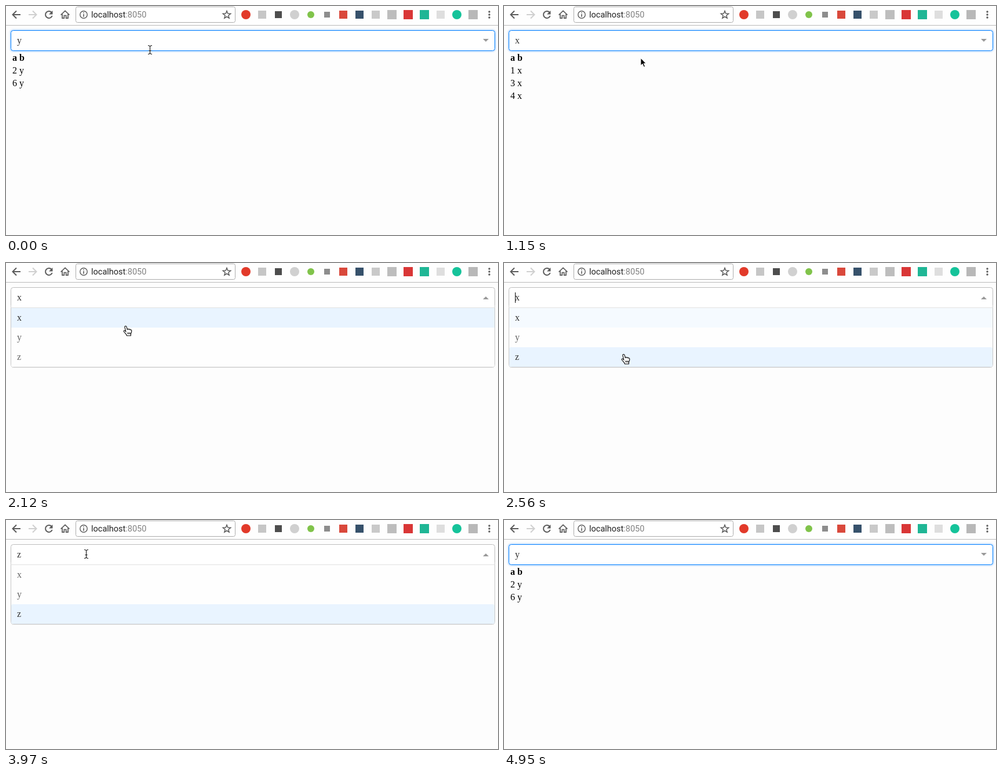
Recreate the animation shown at these times as an HTML page. Size 849x397 px, loop 5.93 s.

```html
<!DOCTYPE html>
<html lang="en">
<head>
<meta charset="utf-8">
<title>Dropdown filter</title>
<style>
  html, body { margin: 0; width: 100%; height: 100%; overflow: hidden; background: #fdfdfd; }
  svg { display: block; }
  .page { font: 16px "Liberation Serif", Times, serif; white-space: pre; }
  .url { font: 14.5px Roboto, "Liberation Sans", sans-serif; }
  .line { fill: none; stroke: #5a5a5a; stroke-width: 2; }
</style>
</head>
<body>
<svg width="849" height="397" viewBox="0 0 849 397">
  <!-- browser toolbar -->
  <rect width="849" height="33" fill="#fefefe"/>
  <path d="M0 33.5H849" stroke="#b9b9b9"/>
  <path id="back" class="line" d="M25 15H12M18 8.5L11.5 15L18 21.5"/>
  <path class="line" style="stroke:#cfcfcf" d="M39 15H52M46 8.5L52.5 15L46 21.5"/>
  <path class="line" d="M78.6 11A6 6 0 1 0 79.7 17"/>
  <path d="M80.5 8V14.5H74Z" fill="#5a5a5a"/>
  <path class="line" style="stroke-width:1.7" d="M94.5 15.5L102 8.5L109.5 15.5M97 14V21.2H100.3V16.5H103.7V21.2H107V14"/>
  <rect x="120.5" y="1.5" width="275" height="27" rx="3" fill="#fff" stroke="#ababab"/>
  <circle cx="134" cy="15" r="6.2" class="line" style="stroke-width:1.4"/>
  <path d="M134 11V12.6M134 14V18.8" class="line" style="stroke-width:1.6"/>
  <text class="url" x="147" y="20" fill="#222">localhost<tspan fill="#808080">:8050</tspan></text>
  <path id="star" class="line" style="stroke-width:1.5"/>
  <g id="extensions"></g>
  <g fill="#5a5a5a"><circle cx="834" cy="10" r="1.7"/><circle cx="834" cy="15" r="1.7"/><circle cx="834" cy="20" r="1.7"/></g>

  <g class="page">
    <g id="table"></g>
    <g id="glow" fill="none" stroke="#007eff">
      <rect x="8.5" y="42.5" width="835" height="35" rx="4" stroke-width="7" opacity=".06"/>
      <rect x="8.5" y="42.5" width="835" height="35" rx="4" stroke-width="4" opacity=".12"/>
    </g>
    <g id="menu">
      <path d="M10 181.5H842" stroke="#ececec"/>
      <path d="M8.5 78V176.5Q8.5 180.5 12.5 180.5H839.5Q843.5 180.5 843.5 176.5V78" fill="#fff" stroke="#c8c8c8"/>
      <g id="rows"></g>
    </g>
    <rect id="control" x="8.5" y="42.5" width="835" height="35" rx="4" fill="#fff"/>
    <path id="divider" d="M8.5 73V77.5H843.5V73" fill="#fff" stroke="#ccc"/>
    <path id="seam" d="M9 77.5H843" stroke="#e2e2e2"/>
    <path id="arrow" fill="#999"/>
    <text id="value" x="19" y="65" fill="#333"></text>
    <path id="caret" d="M19.5 51V69" stroke="#000"/>
  </g>

  <g id="pointer">
    <path id="arrowShape" d="M.8 .8V14.8L4 11.8L6.2 17L8.7 16L6.5 10.9H10.6Z" fill="#000" stroke="#fff" stroke-width="1.2"/>
    <path id="handShape" d="M-2.2 1.8C-2 -.2 .6 -.2 1 1.6L2.3 6.2C3 4.8 4.9 5.2 5.2 6.4C6 5.2 7.6 5.7 7.9 7C8.9 6.3 9.9 7.2 9.8 8.8C9.8 11.5 8.6 12.6 8.3 14.2V17H1.4C1.2 14.6 -1.6 13 -3.6 10C-4.6 8.2 -2.9 7.3 -1.5 8.6L-.3 9.8ZM3.1 11.5V14.3M5.1 11.5V14.3M7 11.5V14.3" fill="#fff" stroke="#000" stroke-width="1.1"/>
    <g id="beamShape" fill="none">
      <path d="M-3 -7.5Q.5 -7.5 .5 -5V5Q.5 7.5 -3 7.5M4 -7.5Q.5 -7.5 .5 -5M4 7.5Q.5 7.5 .5 5" stroke="#fff" stroke-width="2.4"/>
      <path d="M-3 -7.5Q.5 -7.5 .5 -5V5Q.5 7.5 -3 7.5M4 -7.5Q.5 -7.5 .5 -5M4 7.5Q.5 7.5 .5 5M-1.5 1.5H2.5" stroke="#111" stroke-width="1.1"/>
    </g>
  </g>
</svg>
<script>
const LOOP = 5930;
const el = id => document.getElementById(id);
const show = (id, on) => el(id).style.display = on ? '' : 'none';

const options = ['x', 'y', 'z'];
const data = ['x', 'y', 'x', 'x', 'z', 'y'];

// time, open, selected value, filter shown in the table, caret
const states = [
  [0, 0, 'y', 'y', 0], [90, 1, 'y', 'y', 0],
  [800, 0, 'x', 'y', 0], [890, 0, 'x', 'x', 0],
  [1600, 1, 'x', 'x', 1], [2120, 1, 'x', 'x', 0], [2560, 1, 'x', 'x', 1],
  [2920, 0, 'z', 'x', 0], [3000, 0, 'z', 'z', 0],
  [3970, 1, 'z', 'z', 0],
  [4590, 0, 'y', 'z', 0], [4680, 0, 'y', 'y', 0]
];

// pointer moves: first step, last step, number of steps, end point
const moves = [
  [360, 450, 2, 244, 95], [1070, 1330, 4, 207, 72],
  [1860, 2300, 6, 207, 145], [2560, 2560, 1, 207, 158], [2650, 2650, 1, 207, 168],
  [3270, 3530, 4, 155, 79], [3620, 3790, 3, 138, 59],
  [4150, 4320, 3, 138, 131], [4860, 4860, 1, 497, 285]
];
const POINTER_GONE = 4950;

function pointerAt(t) {
  let x = 248, y = 76;
  for (const [start, end, n, toX, toY] of moves) {
    if (t < start) break;
    const gap = (end - start) / (n - 1) || 1;
    const p = Math.min(n, Math.floor((t - start) / gap) + 1) / n;
    x += (toX - x) * p;
    y += (toY - y) * p;
  }
  return [Math.round(x), Math.round(y)];
}

function tableMarkup(filter) {
  const rows = data.map((b, i) => `${i + 1} ${b}`).filter(row => row.endsWith(filter));
  return '<text x="11" y="95" font-weight="bold">a b</text>' +
    rows.map((row, i) => `<text x="11" y="${117 + 22 * i}">${row}</text>`).join('');
}

function rowMarkup(value, focus) {
  return options.map((name, i) => {
    const focused = i === focus, selected = name === value;
    const fill = focused ? '#e9f4ff' : selected ? '#f5faff' : '#fefefe';
    return `<rect x="9" y="${78 + 34 * i}" width="834" height="34" rx="${i === 2 ? 3 : 0}" fill="${fill}"/>` +
      `<text x="19" y="${100 + 34 * i}" fill="${focused || selected ? '#333' : '#666'}">${name}</text>`;
  }).join('');
}

let last = '';
function draw(t) {
  const [, open, value, filter, caret] = states.filter(s => s[0] <= t).pop();
  const [x, y] = pointerAt(t);
  const visible = t < POINTER_GONE;
  const key = [open, value, filter, caret, x, y, visible].join();
  if (key === last) return;
  last = key;

  const overMenu = open && y >= 78;
  const overControl = y > 42 && y < 78;
  const focus = overMenu ? Math.floor((y - 78) / 34) : options.indexOf(value);

  el('table').innerHTML = tableMarkup(filter);
  el('rows').innerHTML = rowMarkup(value, focus);
  el('value').textContent = value;
  el('control').setAttribute('stroke', open ? '#bdbdbd' : '#007eff');
  el('arrow').setAttribute('d', open ? 'M823 63L828 58L833 63Z' : 'M823 57L828 62L833 57Z');
  ['menu', 'divider', 'seam'].forEach(id => show(id, open));
  show('glow', !open);
  show('caret', caret);

  show('pointer', visible);
  el('pointer').setAttribute('transform', `translate(${x} ${y})`);
  show('handShape', overMenu);
  show('beamShape', overControl);
  show('arrowShape', !overMenu && !overControl);
}

function drawToolbar() {
  const points = Array.from({ length: 10 }, (_, i) => {
    const r = i % 2 ? 3 : 7, a = Math.PI * (i / 5 - .5);
    return `${(381 + r * Math.cos(a)).toFixed(2)} ${(15.5 + r * Math.sin(a)).toFixed(2)}`;
  });
  el('star').setAttribute('d', `M${points.join('L')}Z`);

  // colour, half size, round
  const icons = [
    ['#e23a2a', 8, 1], ['#c6c6c6', 7], ['#4d4d4d', 6], ['#d0d0d0', 8, 1], ['#80c34a', 6, 1],
    ['#8d8d8d', 5], ['#d9483b', 7], ['#36516b', 7], ['#c9c9c9', 7], ['#bdbdbd', 8],
    ['#d93636', 8], ['#1fb695', 8], ['#dedede', 7], ['#15c39a', 8, 1], ['#b8b8b8', 8]
  ];
  el('extensions').innerHTML = icons.map(([fill, r, round], i) => {
    const x = 414 + 28 * i;
    return `<rect x="${x - r}" y="${15 - r}" width="${2 * r}" height="${2 * r}" rx="${round ? r : 0}" fill="${fill}"/>`;
  }).join('');
}

drawToolbar();
const begin = performance.now();
function tick() {
  draw((performance.now() - begin) % LOOP);
  requestAnimationFrame(tick);
}
tick();
</script>
</body>
</html>
```
